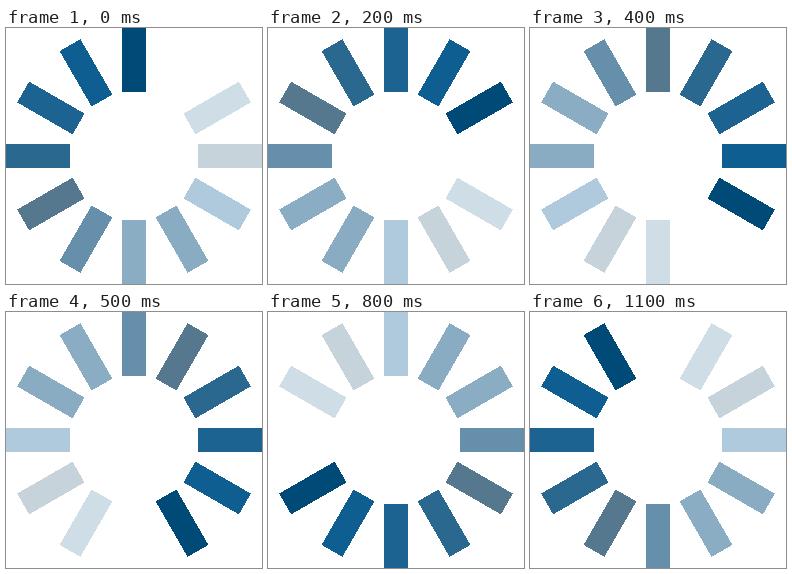
Animation, 256 px wide and 256 px high, one loop 1200 ms. Source, as an HTML page:

```html
<!DOCTYPE html>
<html lang="en">
<head>
<meta charset="utf-8">
<title>Spinner</title>
<style>
html, body { margin: 0; width: 100%; height: 100%; overflow: hidden; background: #fff; }
svg { display: block; width: 100%; height: 100%; }
</style>
</head>
<body>
<svg id="spinner" viewBox="0 0 256 256" shape-rendering="crispEdges"></svg>
<script>
const STEP = 100;
// Colours from the leading bar back to the end of the tail.
const shades = [
  '#004a78', '#0e5e92', '#1d6391', '#2a6890', '#56788f', '#658faa',
  '#8aadc3', '#89acc2', '#afcadc', '#c6d3db', '#cedde6', '#ffffff'
];
const count = shades.length;
const spinner = document.getElementById('spinner');

const bars = shades.map((_, i) => {
  const bar = document.createElementNS('http://www.w3.org/2000/svg', 'rect');
  const attrs = {
    x: 116, y: 0, width: 24, height: 64,
    transform: `rotate(${i * 360 / count} 128 128)`
  };
  for (const name in attrs) bar.setAttribute(name, attrs[name]);
  return spinner.appendChild(bar);
});

function draw(time) {
  const head = Math.floor(time / STEP) % count;
  bars.forEach((bar, i) => bar.setAttribute('fill', shades[(head - i + count) % count]));
}

const start = performance.now();
function tick() {
  draw(performance.now() - start);
  requestAnimationFrame(tick);
}
tick();
</script>
</body>
</html>
```
